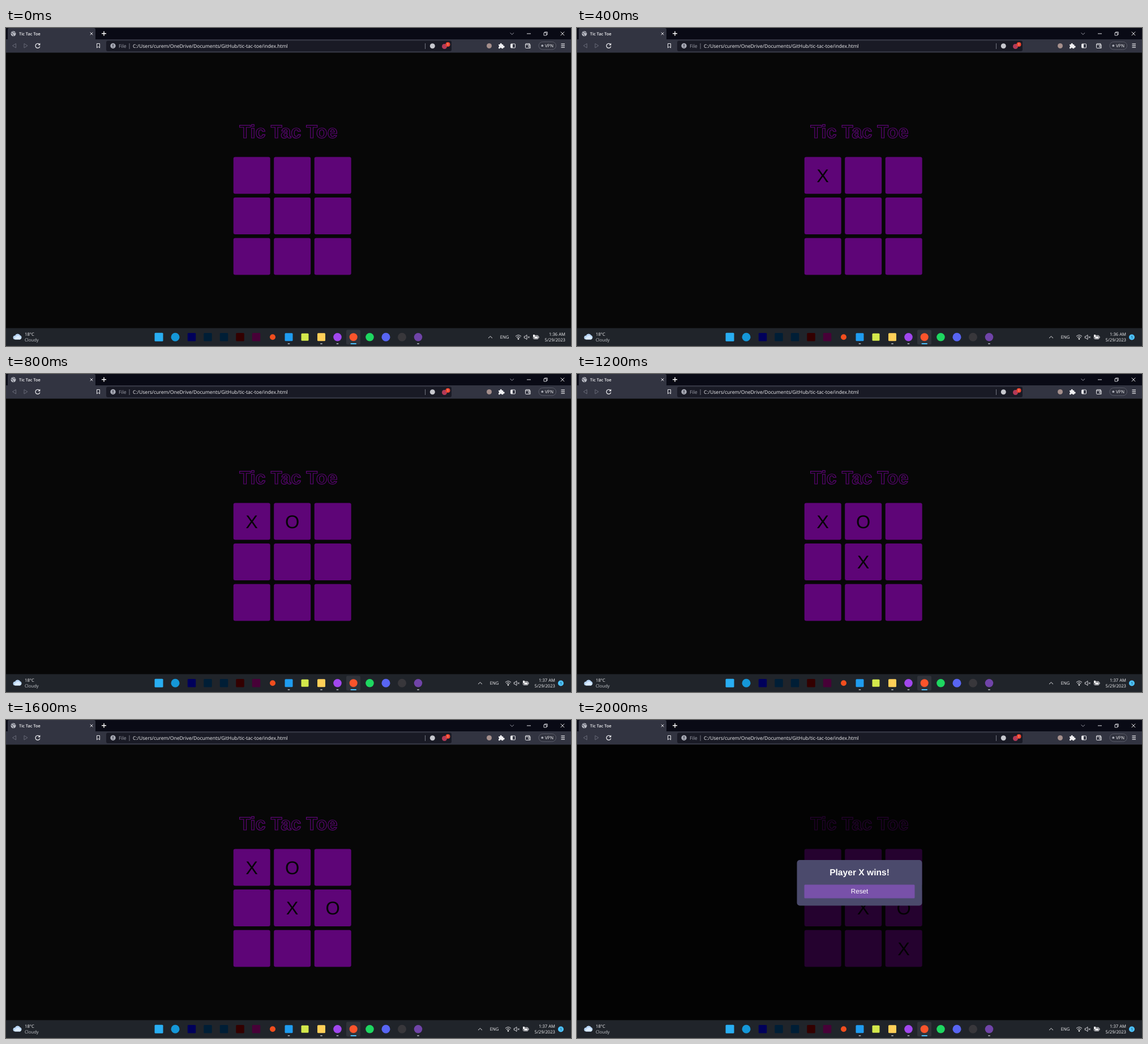
Recreate the animation shown at these times as an HTML page. Size 998 by 561 pixels, loop 2.4 s.

```html
<!DOCTYPE html>
<html lang="en">
<head>
<meta charset="utf-8">
<title>Tic Tac Toe</title>
<style>
  html, body { margin: 0; width: 100%; height: 100%; overflow: hidden; background: #070707; }
  svg { display: block; width: 100%; height: 100%; text-rendering: geometricPrecision; }
  text { font: 7.7px "Open Sans", "Noto Sans", sans-serif; fill: #f4f4f6; }
  .address { font-size: 8.65px; }
  .line { fill: none; stroke: #e6e6ea; stroke-width: 1; stroke-linejoin: round; }
  .dim { stroke: #676977; }
  .end { text-anchor: end; }
  .page text { font-family: "Liberation Sans", Arial, sans-serif; text-anchor: middle; }
  .page .title { font-size: 32.5px; font-weight: bold; fill: none; stroke: #5e0577; stroke-width: 1.2; }
  .page .mark { font-size: 32.5px; fill: #050505; }
  .page .result { font-size: 15.6px; font-weight: bold; fill: #fff; }
  .page .reset { font-size: 11.7px; fill: #fff; }
  .page .cell { fill: #5e0577; }
</style>
</head>
<body>
<svg viewBox="0 0 998 561">
  <!-- Tab strip -->
  <rect width="998" height="21" fill="#090a15"/>
  <path d="M3 20V3q0-3 3-3h149q3 0 3 3v17z" fill="#323441"/>
  <circle cx="13" cy="10" r="4.5" fill="#b9bbc4"/>
  <path d="M9 9q3 0 3 2t2 3M12 6q0 3 5 2" class="line" style="stroke:#3c3e4b"/>
  <text x="23" y="12.7" font-weight="600" style="font-weight:600;font-size:7.4px">Tic Tac Toe</text>
  <path d="M148.700 7.700l4.600 4.600m0-4.600l-4.600 4.600" class="line" stroke-width="1.200"/>
  <path d="M169 9.700h8m-4-4v8" class="line" style="stroke-width:1.4;stroke:#fff"/>
  <path d="M890.500 8.500l3.300 3 3.300-3" class="line" style="stroke:#9a9ba6"/>
  <path d="M920 10h7M979.700 6.700l6.500 6.500m0-6.500l-6.500 6.500" class="line"/>
  <path d="M950 8.300h4.700V13H950zM951.500 8V7h4.700v4.700H955" class="line" style="stroke-width:.9"/>

  <!-- Toolbar -->
  <rect y="20" width="998" height="23.500" fill="#323441"/>
  <path d="M17.500 27.500v7.500l-6-3.750zM32 27.500v7.500l6-3.750z" class="line dim"/>
  <path d="M59.300 29a4 4 0 1 0 .6 3.500" class="line" style="stroke-width:1.3"/>
  <path d="M60.400 26.500v4h-4z" fill="#e6e6ea"/>
  <path d="M160.500 27.500h5v7.500l-2.500-2.200-2.500 2.200z" class="line"/>
  <rect x="177" y="22.500" width="610" height="18.500" rx="3" fill="#191a25"/>
  <circle cx="189" cy="31.500" r="4.700" fill="#a6a8b3"/>
  <path d="M189 28.700v3.300m0 1v1.300" class="line" style="stroke:#191a25;stroke-width:1.2"/>
  <text x="199" y="34.600" class="address" style="fill:#a0a2ad">File</text>
  <path d="M218 27v10M740.500 27v10" class="line" style="stroke:#8b8d98;stroke-width:.8"/>
  <text x="224" y="34.600" class="address">C:/Users/curem/OneDrive/Documents/GitHub/tic-tac-toe/index.html</text>
  <circle cx="753.300" cy="31.700" r="4.500" fill="#c6c7ce"/>
  <circle cx="774.500" cy="32.500" r="4.500" fill="#b23a58"/>
  <circle cx="780.500" cy="29" r="4" fill="#f0452f"/>
  <text x="780.500" y="31" text-anchor="middle" style="font-size:5.5px">1</text>
  <circle cx="853.500" cy="31.500" r="4.500" fill="#a58f8c"/>
  <path d="M870 29h2.600a1.700 1.700 0 1 1 3.200 0h2.400v2.500a1.700 1.700 0 1 1 0 3v1.700h-2.700a1.500 1.500 0 0 0-3 0H870v-2.500a1.600 1.600 0 0 0 0-3z" fill="#f0f0f3"/>
  <rect x="891.500" y="28" width="8" height="7" rx="1" class="line"/>
  <path d="M892 28h3v7h-3z" fill="#e6e6ea"/>
  <path d="M917.500 29q0-1.500 1.500-1.500h6v2M917.500 29v5.500q0 1 1 1h7.500v-6h-7.500q-1 0-1-.5m8.500 2h-3v2.500h3" class="line"/>
  <rect x="941" y="24.500" width="30.500" height="13.500" rx="6.700" fill="#30323e" stroke="#666874" stroke-width=".8"/>
  <circle cx="947.300" cy="31.200" r="1.900" fill="#a9abb5"/>
  <text x="952" y="34">VPN</text>
  <path d="M980.500 28.200h6.500m-6.500 3h6.500m-6.500 3h6.500" class="line" style="stroke-width:1.2"/>

  <!-- Web page -->
  <g class="page">
    <text x="499" y="194" class="title">Tic Tac Toe</text>
    <g id="board"></g>
    <g data-from="5">
      <rect y="43.500" width="998" height="486" fill="#000" opacity=".6"/>
      <rect x="388.500" y="247" width="221" height="80.500" rx="5" fill="#4b4a6c"/>
      <text x="499" y="274" class="result">Player X wins!</text>
      <rect x="401.500" y="290.500" width="195" height="24" rx="1.500" fill="#7851a9"/>
      <text x="499" y="306.300" class="reset">Reset</text>
    </g>
  </g>

  <!-- Taskbar -->
  <rect y="529.500" width="998" height="31.500" fill="#20242a"/>
  <path d="M16 549.500a3.500 3.500 0 0 1 0-7 5 5 0 0 1 9-.5 4 4 0 0 1 0 7.500z" fill="#b8d5f5"/>
  <path d="M16 549.500a3 3 0 0 1 2-5 4 4 0 0 1 7 .5 2.500 2.500 0 0 1 0 4.500z" fill="#dcecff"/>
  <text x="33" y="543">18°C</text>
  <text x="33" y="553.300" style="fill:#c3c6cb">Cloudy</text>
  <rect x="601" y="532.500" width="25" height="26" rx="2.500" fill="#30333a"/>
  <g id="apps"></g>
  <rect x="608.500" y="556" width="10.500" height="2" rx="1" fill="#4cc2ff"/>
  <g id="tray">
    <path d="M852 547.200l3.500-3.300 3.500 3.300" class="line"/>
    <text x="872.700" y="548.300">ENG</text>
    <path d="M900 544q5-4.500 10 0M901.700 546q3.300-3 6.600 0M903.300 547.800q1.700-1.500 3.400 0" class="line"/>
    <circle cx="905" cy="549" r="1" fill="#fff"/>
    <path d="M915.300 544h1.700l3-2.500v8l-3-2.500h-1.700zM921.800 544l3 3m0-3l-3 3" class="line" style="stroke-width:.9"/>
    <rect x="931.500" y="542.500" width="8.500" height="6" rx="1" class="line"/>
    <path d="M933 544h6v3.500h-6zM940.500 544.300h1v2.500h-1zM931 541h3v4h-3z" fill="#f4f4f6"/>
    <text id="clock" x="988" y="543" class="end"></text>
    <text x="988" y="553.300" class="end">5/29/2023</text>
  </g>
  <g data-from="1">
    <circle cx="980" cy="545.500" r="5" fill="#4cc2ff"/>
    <text x="980" y="548" text-anchor="middle" style="font-size:6.5px;fill:#10202c">1</text>
  </g>
</svg>
<script>
  const STEP_MS = 400, STEPS = 6;
  const byId = id => document.getElementById(id);

  function add(parent, tag, attributes, text = "") {
    const node = document.createElementNS("http://www.w3.org/2000/svg", tag);
    for (const name in attributes) node.setAttribute(name, attributes[name]);
    node.textContent = text;
    parent.append(node);
  }

  // Board cells, then the moves in playing order
  const cellX = i => 401.7 + 71.5 * (i % 3);
  const cellY = i => 227.5 + 71.5 * Math.floor(i / 3);
  const board = byId("board");
  for (let i = 0; i < 9; i++) {
    add(board, "rect", { x: cellX(i), y: cellY(i), width: 65, height: 65, rx: 3.3, class: "cell" });
  }
  [0, 1, 4, 5, 8].forEach((cell, turn) => add(board, "text", {
    x: cellX(cell) + 32.5, y: cellY(cell) + 44, class: "mark", "data-from": turn + 1
  }, turn % 2 ? "O" : "X"));

  // Taskbar apps: centre, colour, size, round, running
  const apps = [
    [270, "#29aef2", 15],
    [299, "#1597d8", 15, true],
    [328, "#00005b", 14.5],
    [356.500, "#001e36", 14.5],
    [385, "#001e36", 14.5],
    [413.500, "#330000", 14.5],
    [442, "#470137", 14.5],
    [471, "#f24e1e", 10, true],
    [499.500, "#1f9cf0", 14, false, true],
    [528, "#d3e84b", 13],
    [557, "#ffcf58", 14, false, true],
    [585.500, "#a147ee", 14.5, true, true],
    [613.700, "#fb542b", 14, true],
    [642.500, "#1ed760", 14.5, true],
    [671, "#5865f2", 15, true],
    [699.500, "#38373b", 15, true],
    [728, "#7044a8", 14.5, true, true]
  ];
  for (const [x, fill, size, round, running] of apps) {
    add(byId("apps"), "rect", {
      x: x - size / 2, y: 545.3 - size / 2, width: size, height: size, rx: round ? size / 2 : 1.5, fill
    });
    if (running) add(byId("apps"), "rect", { x: x - 2, y: 556, width: 4, height: 2, rx: 1, fill: "#969aa0" });
  }

  const timed = document.querySelectorAll("[data-from]");

  function draw() {
    const step = Math.floor(performance.now() / STEP_MS) % STEPS;
    for (const node of timed) node.style.display = step >= node.dataset.from ? "" : "none";
    byId("tray").setAttribute("transform", `translate(${step ? -18 : 0} 0)`);
    byId("clock").textContent = step < 2 ? "1:36 AM" : "1:37 AM";
    requestAnimationFrame(draw);
  }
  draw();
</script>
</body>
</html>
```
